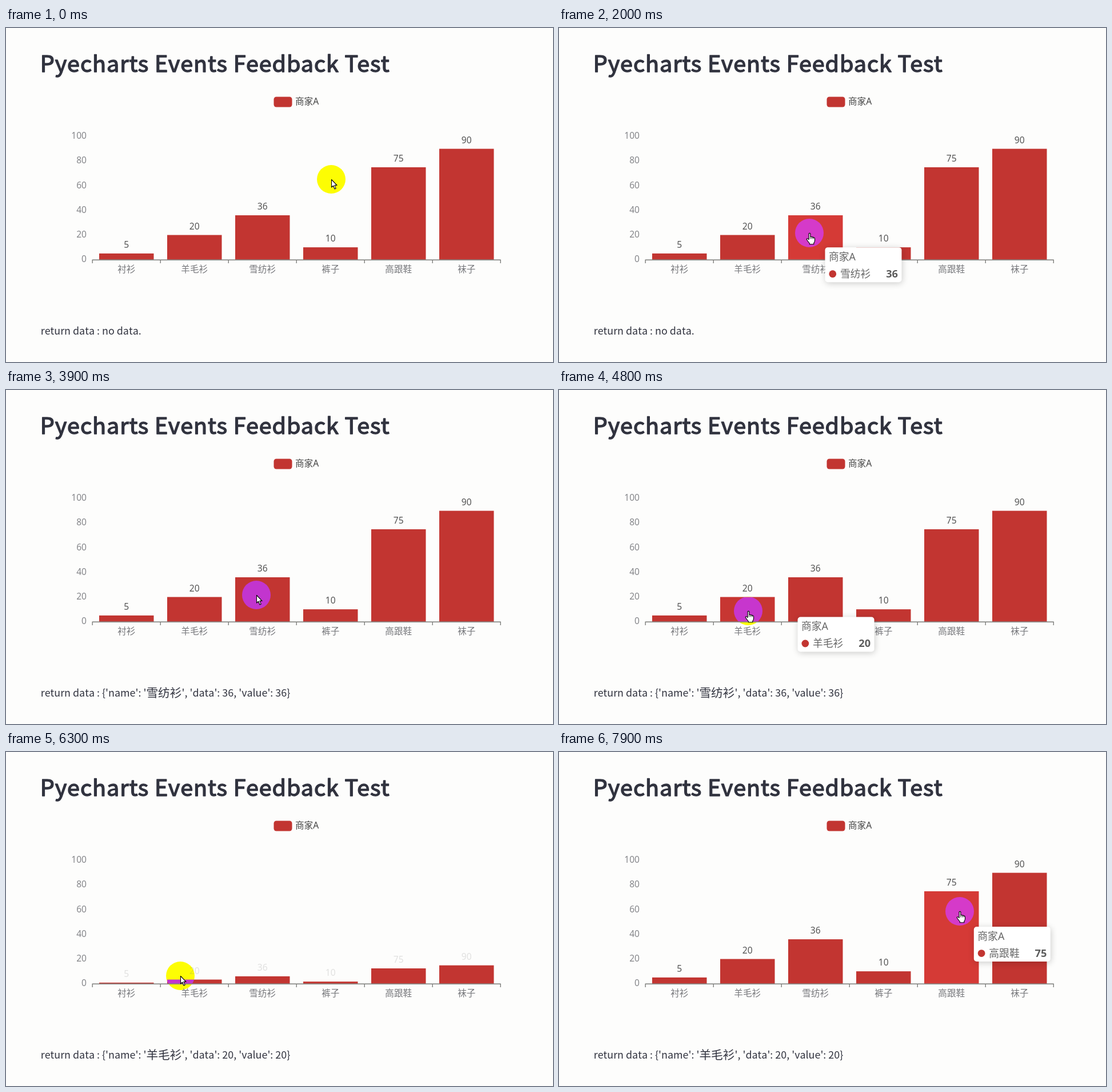
Write an HTML page with a canvas that moves like this. It is 957 px wide and 585 px high and loops after 8 s.

```html
<!DOCTYPE html>
<html lang="en">
<head>
<meta charset="utf-8">
<title>Pyecharts Events Feedback Test</title>
<style>
  html, body { margin: 0; width: 100%; height: 100%; overflow: hidden; background: #fdfdfc; }
  canvas { display: block; }
</style>
</head>
<body>
<canvas id="stage" width="957" height="585"></canvas>
<script>
const ctx = document.getElementById('stage').getContext('2d');
const LOOP = 8000, STEP = 100;
const BG = '#fdfdfc', RED = [194, 53, 49];
const PAGE = '"Noto Sans CJK SC", "Noto Sans CJK JP", "Noto Sans CJK", sans-serif';
const CHART = '"Noto Sans", "Noto Sans CJK SC", "Noto Sans CJK JP", "Noto Sans CJK", sans-serif';

const names = ['衬衫', '羊毛衫', '雪纺衫', '裤子', '高跟鞋', '袜子'];
const values = [5, 20, 36, 10, 75, 90];
const LEFT = 151, BASE = 405.7, SLOT = 119, BAR_W = 95.5, UNIT = 2.157;
const barX = i => LEFT + 12 + i * SLOT;
const barTop = (i, grow = 1) => BASE - values[i] * UNIT * grow;

// Pointer strokes; it rests between them
const home = { x: 569, y: 265 };
const moves = [
  { start: 0, end: 200, x: 540, y: 282 },
  { start: 200, end: 400, x: 512, y: 256 },
  { start: 700, end: 1200, x: 448, y: 340 },
  { start: 1200, end: 1600, x: 438, y: 359 },
  { start: 4500, end: 4800, x: 331, y: 387 },
  { start: 4800, end: 5400, x: 305, y: 392 },
  { start: 6600, end: 7100, x: 673, y: 297 },
  { start: 7100, end: 7500, x: 701, y: 279 }
];
// A click dims the page below fadeTop, then the chart is built anew
const clicks = [{ time: 3400, fadeTop: 0 }, { time: 6000, fadeTop: 110 }];
const REPLY = 300, GROWTH = 200;

const clamp = v => Math.min(1, Math.max(0, v));
const rgb = c => `rgb(${c.map(Math.round).join()})`;

function cursor(t) {
  return moves.reduce((p, m) => {
    const k = 1 - (1 - clamp((t - m.start) / (m.end - m.start))) ** 1.3;
    return { x: p.x + (m.x - p.x) * k, y: p.y + (m.y - p.y) * k };
  }, home);
}

const lastClick = (t, delay = 0) => clicks.findLast(c => t >= c.time + delay);

// After a rebuild nothing is hovered until the pointer moves again
function rebuilt(t) {
  const click = lastClick(t, REPLY);
  return !!click && moves.every(m => m.start >= t || m.end <= click.time);
}

function hovered(t) {
  if (rebuilt(t)) return -1;
  const { x, y } = cursor(t);
  return values.findIndex((v, i) =>
    x >= barX(i) && x <= barX(i) + BAR_W && y >= barTop(i) && y <= BASE);
}

function growth(t) {
  const click = lastClick(t, REPLY);
  return click ? 1 - .835 * (1 - clamp((t - click.time - REPLY) / GROWTH)) ** 2 : 1;
}

function lift(i, t) {
  let n = 0;
  while (n < 5 && hovered(t - n * STEP) === i) n++;
  return Math.max(0, n - 1) / 4;
}

// The tooltip trails the pointer one step behind and fades with hovering
function tooltip(t) {
  const tip = { x: 0, y: 0, alpha: 0, item: -1 };
  for (let s = 0; s <= t; s += STEP) {
    const item = hovered(s), first = tip.item < 0;
    if (item >= 0) tip.item = item;
    if (rebuilt(s)) tip.alpha = 0;
    if (item >= 0 || tip.alpha > 0) {
      const goal = cursor(first ? s : s - STEP), k = first ? 1 : .45;
      tip.x += (goal.x + 27 - tip.x) * k;
      tip.y += (goal.y + 26 - tip.y) * k;
    }
    tip.alpha = clamp(tip.alpha + (item >= 0 ? .6 : -.15));
  }
  return tip;
}

function text(str, x, y, font, color, align = 'left') {
  ctx.font = font;
  ctx.fillStyle = color;
  ctx.textAlign = align;
  ctx.fillText(str, x, y);
  return x + ctx.measureText(str).width;
}

function rounded(x, y, w, h, r, color) {
  ctx.fillStyle = color;
  ctx.beginPath();
  ctx.roundRect(x, y, w, h, r);
  ctx.fill();
}

function disc(x, y, r, color) {
  ctx.fillStyle = color;
  ctx.beginPath();
  ctx.arc(x, y, r, 0, Math.PI * 2);
  ctx.fill();
}

function drawTitle(str, x, y, ink) {
  ctx.save();
  ctx.letterSpacing = '0.95px';
  text(str, x, y, '39.5px ' + PAGE, ink);
  // A thin outline gives the semibold weight
  ctx.strokeStyle = ink;
  ctx.lineWidth = 1.5;
  ctx.lineJoin = 'round';
  ctx.strokeText(str, x, y);
  ctx.restore();
}

function drawPage(t) {
  const ink = '#31333f', latin = '17.9px ' + PAGE, x = 60.7, y = 537.3;
  drawTitle('Pyecharts Events Feedback Test', 59.8, 76.6, ink);
  ctx.fontKerning = 'none';
  const click = lastClick(t, REPLY);
  if (click) {
    const i = hovered(click.time);
    let end = text("return data : {'name': '", x, y, latin, ink);
    end = text(names[i], end, y + .5, '20.7px ' + PAGE, ink);
    text(`', 'data': ${values[i]}, 'value': ${values[i]}}`, end, y, latin, ink);
  } else {
    text('return data : no data.', x, y, latin, ink);
  }
  ctx.fontKerning = 'auto';
}

function drawChart(t) {
  const font = '15.6px ' + CHART, grow = growth(t);
  rounded(468.5, 120.5, 32, 18, 4.5, rgb(RED));
  text('商家A', 506, 133.5, font, '#444');
  for (let i = 0; i <= 5; i++) {
    text(String(i * 20), 141, 410 - i * 20 * UNIT, font, '#85868a', 'right');
  }
  values.forEach((v, i) => {
    const top = barTop(i, grow), mid = barX(i) + BAR_W / 2, gain = 1 + .1 * lift(i, t);
    ctx.fillStyle = rgb(RED.map(c => c * gain));
    ctx.fillRect(barX(i), top, BAR_W, BASE - top);
    ctx.globalAlpha = grow;
    text(String(v), mid, top - 10, font, '#555', 'center');
    ctx.globalAlpha = 1;
    text(names[i], mid, 428, font, '#76777b', 'center');
  });
  ctx.strokeStyle = '#7c7d7a';
  ctx.lineWidth = 1.4;
  ctx.beginPath();
  ctx.moveTo(LEFT - .5, 406.3);
  ctx.lineTo(LEFT + 6 * SLOT + .8, 406.3);
  for (let i = 0; i <= 6; i++) {
    ctx.moveTo(LEFT + i * SLOT + .2, 406);
    ctx.lineTo(LEFT + i * SLOT + .2, 412);
  }
  ctx.stroke();
}

function drawTip(t) {
  const { x, y, alpha, item } = tooltip(t);
  if (alpha <= 0) return;
  ctx.save();
  ctx.globalAlpha = alpha;
  ctx.shadowColor = 'rgba(0,0,0,.2)';
  ctx.shadowBlur = 12;
  ctx.shadowOffsetX = 1;
  ctx.shadowOffsetY = 2;
  rounded(x, y, 134, 61, 5, '#fff');
  ctx.shadowColor = 'transparent';
  text('商家A', x + 6.5, y + 23, '17.8px ' + CHART, '#666');
  disc(x + 13.3, y + 46.6, 6.4, rgb(RED));
  text(names[item], x + 26.5, y + 53, '17.8px ' + CHART, '#666');
  text(String(values[item]), x + 127.5, y + 53, 'bold 18.2px ' + CHART, '#5c5c5c', 'right');
  ctx.restore();
}

function drawFade(t) {
  const click = lastClick(t);
  if (!click || t >= click.time + REPLY) return;
  ctx.globalAlpha = .07 * (t - click.time + STEP) / REPLY;
  ctx.fillStyle = BG;
  ctx.fillRect(0, click.fadeTop, 957, 585);
  ctx.globalAlpha = 1;
}

const arrow = new Path2D('M.5 .5V14L3.6 11.2L6 17L8.2 16.1L5.8 10.4H10Z');
const hand = new Path2D('M-.9 1.2Q.5 -.4 1.8 1.2V7Q3.5 5.7 4.6 7.4Q6.2 6.4 7.2 8.2' +
  'Q9.4 7.6 9.5 10V13.5Q9.2 16 7.8 17.5V19.7H.3V18Q-2.4 15 -4.8 11.2Q-4.4 8.7 -2 10.4L-.9 11.5Z');

function drawCursor(t) {
  const { x, y } = cursor(t), shape = hovered(t) < 0 ? arrow : hand;
  ctx.save();
  // The halo inverts blue only: yellow on white, violet on red
  ctx.globalCompositeOperation = 'difference';
  disc(x, y, 25, '#00f');
  ctx.globalCompositeOperation = 'source-over';
  ctx.translate(x, y);
  ctx.lineWidth = 1.1;
  ctx.lineJoin = 'round';
  ctx.fillStyle = '#fff';
  ctx.strokeStyle = '#000';
  ctx.fill(shape);
  ctx.stroke(shape);
  if (shape === hand) {
    ctx.lineWidth = .9;
    ctx.beginPath();
    for (const fx of [1.8, 4.6, 7.2]) {
      ctx.moveTo(fx, 7.5);
      ctx.lineTo(fx, 10.5);
    }
    ctx.stroke();
  }
  ctx.restore();
}

function draw(now) {
  const t = Math.floor((now % LOOP) / STEP) * STEP;
  ctx.fillStyle = BG;
  ctx.fillRect(0, 0, 957, 585);
  drawPage(t);
  drawChart(t);
  drawTip(t);
  drawFade(t);
  drawCursor(t);
}

let start;
function tick(now) {
  start ??= now;
  draw(now - start);
  requestAnimationFrame(tick);
}
draw(0);
requestAnimationFrame(tick);
</script>
</body>
</html>
```
